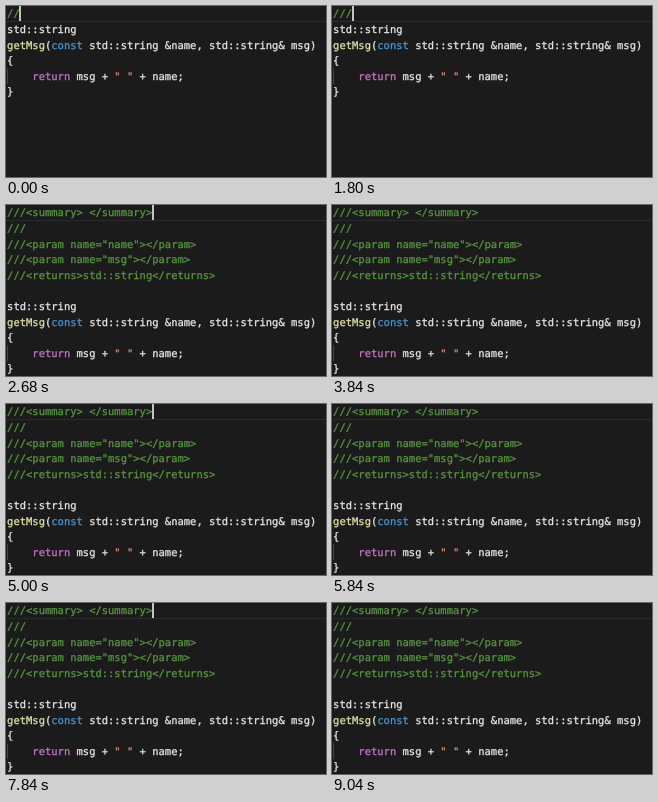
An HTML page with a canvas that plays this animation: 320x171 px, repeating every 9080 ms.

```html
<!DOCTYPE html>
<html lang="en">
<head>
<meta charset="utf-8">
<title>Doc comment typing</title>
<style>
  html, body { margin: 0; width: 100%; height: 100%; overflow: hidden; background: #1b1b1b; }
  canvas { display: block; width: 320px; height: 171px; }
</style>
</head>
<body>
<canvas id="stage"></canvas>
<script>
const W = 320, H = 171, LOOP = 9080;
const LEFT = 1.1, CHAR = 6.31, ROW = 15.6, BASE = 11.4;
const TYPED = 1800, EXPANDED = 1920, COLOURED = 2000;
const BLINK_START = 3440, BLINK = 1160;

const color = {
  bg: '#1b1b1b', plain: '#e6e6e6', comment: '#56953f', func: '#e0e0a4',
  type: '#4595d6', keyword: '#c472c8', string: '#d68a68', caret: '#c4c4c4',
  guide: '#444444', lineEdge: '#2b2b2b'
};

// Each line is a list of [style, text] runs.
const code = [
  [['plain', 'std::string']],
  [['func', 'getMsg'], ['plain', '('], ['type', 'const'],
   ['plain', ' std::string &name, std::string& msg)']],
  [['plain', '{']],
  [['plain', '    '], ['keyword', 'return'], ['plain', ' msg + '],
   ['string', '" "'], ['plain', ' + name;']],
  [['plain', '}']]
];
const doc = [
  '///<summary> </summary>',
  '///',
  '///<param name="name"></param>',
  '///<param name="msg"></param>',
  '///<returns>std::string</returns>',
  ''
];

const canvas = document.getElementById('stage');
const ctx = canvas.getContext('2d');
const dpr = window.devicePixelRatio || 1;
canvas.width = Math.round(W * dpr);
canvas.height = Math.round(H * dpr);

function rect(fill, x, y, w, h) {
  ctx.fillStyle = fill;
  ctx.fillRect(x, y, w, h);
}

// A thin outline gives the letters a medium weight.
function drawLine(runs, row) {
  const y = BASE + row * ROW;
  let col = 0;
  for (const [style, text] of runs) {
    ctx.fillStyle = ctx.strokeStyle = color[style];
    for (const ch of text) {
      const x = LEFT + col++ * CHAR;
      if (ch === ' ') continue;
      ctx.fillText(ch, x, y);
      ctx.strokeText(ch, x, y);
    }
  }
}

function commentLines(t) {
  if (t < TYPED) return ['//'];
  return t < EXPANDED ? ['///'] : doc;
}

function caretOn(t) {
  return t < BLINK_START || Math.floor((t - BLINK_START) / BLINK) % 2 === 1;
}

function draw(t) {
  ctx.setTransform(dpr, 0, 0, dpr, 0, 0);
  ctx.font = '10.47px "DejaVu Sans Mono", monospace';
  ctx.textRendering = 'geometricPrecision';
  ctx.textBaseline = 'alphabetic';
  ctx.lineWidth = 0.3;
  ctx.lineJoin = 'round';

  rect(color.bg, 0, 0, W, H);
  rect(color.lineEdge, 0, 15, W, 1);

  const comments = commentLines(t);
  const top = comments.length;
  const fresh = t >= EXPANDED && t < COLOURED;
  comments.forEach((text, i) =>
    drawLine([[fresh && i > 0 ? 'plain' : 'comment', text]], i));

  rect(color.guide, 1, (top + 3) * ROW, 1, ROW);
  code.forEach((runs, i) => drawLine(runs, top + i));

  if (caretOn(t)) {
    rect(color.caret, Math.round(LEFT + comments[0].length * CHAR - 0.5), 0, 2, 15);
  }
}

const start = performance.now();
function tick() {
  draw((performance.now() - start) % LOOP);
  requestAnimationFrame(tick);
}
tick();
</script>
</body>
</html>
```
